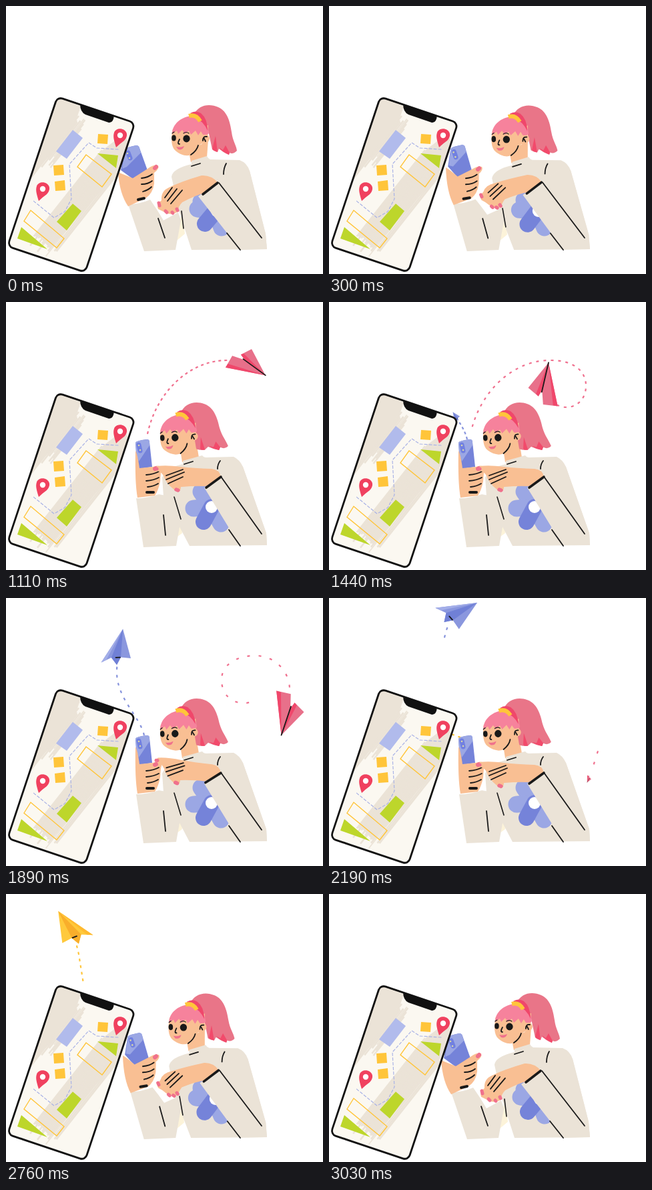
Animation of 475x400 px, one loop 3.06 s. Source, as an HTML page:

```html
<!DOCTYPE html>
<html lang="en">
<head>
<meta charset="utf-8">
<title>Paper planes</title>
<style>
html, body { margin: 0; width: 100%; height: 100%; overflow: hidden; background: #fff; }
svg { display: block; width: 475px; height: 400px; }
.line { fill: none; stroke-linecap: round; stroke-linejoin: round; }
.ink { stroke: #191919; stroke-width: 1.8; }
</style>
</head>
<body>
<svg viewBox="0 0 475 400">
  <defs>
    <rect id="case" x="36.500" y="149" width="122.500" height="235" rx="8" transform="rotate(18.500 97.700 266.500)"/>
    <clipPath id="screen"><use href="#case"/></clipPath>
    <g id="pin">
      <path d="M-6 18C-9 8 -11 2 -9 -4C-7 -10 1 -11 6 -8C12 -4 11 3 6 8Q-1 13 -6 18Z" fill="#f0415f"/>
      <circle r="4.200" fill="#fff"/>
    </g>
    <g id="dart">
      <path d="M0 0L24 62L2 63L-3 42L-7 52L-24 42Z" fill="#e8708a"/>
      <path d="M0 0L24 62L17 62ZM0 0L-3 42L-7 52L-11 49Z" fill="#f0476b"/>
      <path d="M0 0L-3 45" class="line ink"/>
    </g>
    <g id="glider">
      <path d="M0 0L33 54L17 46L8 57L2 45L-14 46Z" fill="var(--main)"/>
      <path d="M0 0L17 46L8 57L2 45Z" fill="var(--fold)"/>
      <path d="M0 0L33 54L25 50Z" fill="var(--edge)"/>
      <path d="M3 45L10 45.500" class="line ink"/>
    </g>
  </defs>

  <g id="sky"></g>
  <g id="body"></g>

  <g id="head">
    <g id="tail"></g>
    <path d="M250 183C247 197 247 210 254 216C261 222 270 225 277 222Q285 218 292 206L302 203L303 178Z" fill="#f9bf93"/>
    <path d="M249 191C249 176 263 165 279 164C295 165 303 177 304 190Q301 194 295 192L292 187L288 193L284 186L277 192L274 186L268 191L264 185L258 191L256 186Z" fill="#f6829c"/>
    <path d="M276 160Q284 155 292 160Q302 168 302 186Q296 172 284 167Z" fill="#f0476b"/>
    <path d="M274 164Q285 161 291 172" class="line" stroke="#ffc53a" stroke-width="6" style="stroke-linecap:butt"/>
    <circle cx="299" cy="198" r="6" fill="#f9bf93"/>
    <g class="line ink">
      <path d="M295 201Q295 194 301 195M297 198L299 202M277 222Q286 216 288 208M260 199Q256 206 260 206"/>
      <path d="M249 190L252 188M266 190Q270 187 274 190" stroke-width="1.200"/>
    </g>
    <ellipse cx="251.500" cy="197" rx="3.300" ry="4.600" fill="#191919"/>
    <ellipse cx="270.500" cy="198" rx="5.200" ry="5.400" fill="#191919"/>
    <path d="M255 210Q261 212 267 209Q265 216 258 214Z" fill="#f0718c"/>
  </g>

  <g id="grip"></g>
  <g id="pointer"></g>

  <g clip-path="url(#screen)">
    <path d="M0 130H200V400H0Z" fill="#fbf8f1"/>
    <g id="brush" fill="none"></g>
    <path d="M100 185L115 197L91 228L75 217Z" fill="#b1bbec"/>
    <path d="M138 191L153 192L152 206L137 205ZM71 238L86 237L87 252L72 253ZM73 262L88 260L89 275L74 276Z" fill="#ffc53a"/>
    <path d="M137 220L168 223L165 242ZM100 295L113 306L91 335L76 322ZM23 330L62 363L17 347Z" fill="#bdd62b"/>
    <path d="M120 222L158 251L144 270L107 240ZM37 305L87 347L76 361L27 321Z" fill="none" stroke="#ffc53a" stroke-width="1.400"/>
    <path d="M168 214L136 212L124 204L95 236L98 288L88 307L72 316L40 290" class="line" stroke="#aab3e6" stroke-width="1.200" stroke-dasharray="4 3"/>
    <use href="#pin" x="171" y="193"/>
    <use href="#pin" x="55" y="273"/>
    <path d="M111 146L162 163Q161 175 154 174L119 162Q111 158 111 146Z" fill="#111"/>
  </g>
  <use href="#case" fill="none" stroke="#111" stroke-width="2.800"/>
</svg>

<script>
const LOOP = 3060, MOVE = 880;
const SKIN = '#f9bf93', WOOL = '#ebe3d7', INK = '#191919', NAIL = '#f0718c', BLUE = '#7583d9', PALE = '#9ba7e4';
const $ = id => document.getElementById(id);

function add(parent, tag, attrs) {
  const el = document.createElementNS('http://www.w3.org/2000/svg', tag);
  for (const key in attrs) el.setAttribute(key, attrs[key]);
  return parent.appendChild(el);
}

// Brushed areas of the map: broad strokes with ragged ends
function brush(count, x, y, dx, dy, length) {
  for (let i = 0; i < count; i++) {
    const a = 7 * Math.sin(i * 7.3), b = 9 * Math.sin(i * 4.1);
    const x1 = x + dx * i - a * .66, y1 = y + dy * i + a * .75;
    add($('brush'), 'path', {
      d: `M${x1} ${y1}l${-.62 * (length + b)} ${.78 * (length + b)}`,
      stroke: WOOL, 'stroke-width': i % 5 == 4 ? 1.6 : 2.6
    });
  }
}
add($('brush'), 'path', { d: 'M70 130L112 150L101 182L58 232L30 268Z', fill: WOOL });
brush(8, 109, 164, 1, 2.2, 78);
add($('brush'), 'path', { d: 'M146 214L178 190L187 215L150 268L66 362L48 342Z', fill: WOOL });
brush(18, 144, 215, 1.9, 1.4, 165);

// Moving parts: colour, pose away, pose close, stroke width (none = filled)
const bodyParts = [
  ['#fcf3d9', 'M264 300L256 350L268 340Z', 'M262 310L257 350L264 345Z'],
  [WOOL, 'M183 296Q200 296 216 289Q226 303 236 320L258 308L262 320L254 364L207 366Z',
         'M195 293Q212 293 229 287Q234 288 240 289L251 290L262 325L255 364L206 366Z'],
  [SKIN, 'M274 218L303 200L301 226L277 233Z', 'M261 220L284 202L289 232L264 239Z'],
  [WOOL, 'M278 231L301 224Q303 228 306 229L350 230Q361 234 365 246L389 340L391 363L278 364L259 305L248 255Q249 243 278 236Z',
         'M265 237L294 229Q296 232 300 232L341 231Q350 235 355 246L390 345L391 363L275 364L236 290L234 262Q240 247 265 242Z'],
  [PALE, 'M314 306L292 292', 'M308 306L292 283', 25],
  [PALE, 'M314 306L323 331', 'M308 306L322 331', 25],
  [PALE, 'M314 306L287 303', 'M308 306L281 308', 25],
  [BLUE, 'M314 306L298 325', 'M308 306L296 328', 24],
  ['#fff', 'M316 306L316 306', 'M308 306L308 306', 18],
  [WOOL, 'M318 264L355 240L365 246L389 340L391 363L351 364L288 284Z',
         'M322 260L350 240L355 246L390 345L391 363L350 363L297 277Z'],
  [INK, 'M331 339L351 364', 'M334 340L351 364', 1.8],
  [INK, 'M319 264L383 346', 'M323 262L383 346', 1.8],
  [INK, 'M326 251Q326 242 330 235', 'M317 249Q317 242 321 237', 1.8],
  [INK, 'M278 239L291 235', 'M267 242L280 238', 1.8],
  [INK, 'M228 317L238 346', 'M236 318L239 348', 1.8],
  [INK, 'M263 306L266 332', 'M252 291L262 324', 1.6]
];
const tailParts = [
  ['#e97588', 'M281 163C288 147 305 145 318 151C332 157 336 174 338 188C340 203 345 207 346 216Q340 222 335 219L334 222Q326 219 319 213L317 218Q311 216 309 214L303 186Z',
              'M281 163C288 147 305 145 318 151C332 157 336 174 338 188C341 201 346 207 349 216Q344 221 337 217L335 221Q326 219 319 215L314 219Q307 220 301 217L298 186Z'],
  ['#f24a6b', 'M314 194L317 218Q310 216 309 213ZM329 208L335 219L334 222Q324 218 319 211L325 215Z',
              'M309 200L314 219Q309 220 307 217ZM331 208L337 217L335 221Q326 219 321 214L327 216Z']
];
const gripParts = [
  [BLUE, 'M178 214Q180 211 195 208Q199 208 200 212L213 248L190 258L172 245Z',
         'M194 210Q195 207 211 205Q215 205 215 209L219 246L199 249L195 225Z'],
  [PALE, 'M178 214Q180 211 195 208Q199 208 200 212L202 219L181 240L174 243Z',
         'M194 210Q195 207 211 205Q215 205 215 209L215 214L199 238L195 225Z'],
  ['#7180e0', 'M183 219L186 227', 'M199 213L201 222', 7],
  ['#d9d6a8', 'M182 220L182 220', 'M199 214L199 214', 2.6],
  ['#d9d6a8', 'M185 227L185 227', 'M201 221L201 221', 2.6],
  [SKIN, 'M168 248Q175 251 190 257L212 243Q222 236 228 238Q230 243 222 249L222 265Q220 280 209 287L183 299Q170 280 168 248Z',
         'M194 222Q197 226 200 248L220 246Q228 243 233 246Q234 250 232 254L231 268Q228 282 223 289L197 292Q193 270 194 222Z'],
  [NAIL, 'M223 242L225 240', 'M223 249L225 248', 6],
  [INK, 'M203 257Q213 256 219 251', 'M210 258Q222 257 229 253', 1.8],
  [INK, 'M203 266Q213 266 219 261', 'M210 267Q222 266 229 262', 1.8],
  [INK, 'M205 277Q213 275 218 270', 'M212 276Q222 275 228 271', 1.8],
  [INK, 'M198 289L207 287', 'M211 284L221 284', 4]
];
const pointerParts = [
  [SKIN, 'M318 264Q308 252 293 253Q262 262 244 271Q232 276 233 290Q225 296 228 303Q234 306 240 309Q250 313 259 306Q257 300 264 293Q285 282 298 279Z',
         'M322 261Q320 250 308 249Q280 248 262 246Q240 243 226 245Q222 250 229 253Q236 256 238 264Q245 277 257 283Q262 282 262 276Q285 274 299 275Z'],
  [NAIL, 'M229 294L230 298', 'M224 249L226 249', 5],
  [NAIL, 'M239 306L241 308', 'M255 280L257 281', 5],
  [NAIL, 'M249 308L250 309', 'M255 280L258 281', 5],
  [NAIL, 'M256 303L257 305', 'M256 280L258 281', 5],
  [INK, 'M238 286L249 271', 'M240 259L265 250', 1.8],
  [INK, 'M242 291L256 273', 'M240 265L267 254', 1.8],
  [INK, 'M247 295L264 275', 'M243 271L265 261', 1.8],
  [INK, 'M295 281L317 264', 'M300 277L322 261', 3.6]
];

function build(parent, parts) {
  return parts.map(([color, a, b, width]) => {
    const el = add(parent, 'path', width
      ? { class: 'line', stroke: color, 'stroke-width': width } : { fill: color });
    const ends = b.match(/[\d.]+/g);
    return p => {
      let i = 0;
      el.setAttribute('d', a.replace(/[\d.]+/g, n => (+n + (ends[i++] - n) * p).toFixed(2)));
    };
  });
}
const figure = [
  ...build($('body'), bodyParts), ...build($('tail'), tailParts),
  ...build($('grip'), gripParts), ...build($('pointer'), pointerParts)
];

// Piecewise linear value through [time, value] pairs
function along(t, keys) {
  if (t <= keys[0][0]) return keys[0][1];
  for (let i = 1; i < keys.length; i++) {
    const [t0, v0] = keys[i - 1], [t1, v1] = keys[i];
    if (t <= t1) return v0 + (v1 - v0) * (t - t0) / (t1 - t0);
  }
  return keys[keys.length - 1][1];
}

const planes = [
  { shape: 'dart', color: '#f0718f', grow: 260, step: [[1110, 9], [1440, 11], [1890, 17]], turn: '',
    d: 'M212 197C225 135 275 86 333 87C365 87 386 102 385 127C384 148 368 158 354 157C335 155 323 142 323 122C323 100 345 86 373 86C402 86 424 108 425 135C426 160 420 180 411 204C400 235 395 260 380 290',
    head: [[585, 0], [1110, 238], [1440, 383], [1890, 570], [2210, 650]],
    tail: [[1440, 0], [1890, 285], [2210, 600]] },
  { shape: 'glider', color: '#8592dc', grow: 180, step: [[1440, 8], [1890, 12]], turn: 'scale(-1 1) rotate(9)',
    vars: '--main:#8a97de;--fold:#7080d6;--edge:#a3aee8',
    d: 'M207 205C200 175 165 150 166 108C167 85 171 65 176 48C183 24 202 13 228 14Q245 16 255 24',
    head: [[1270, 0], [1440, 46], [1890, 169], [2160, 225], [2340, 265]],
    tail: [[1950, 0], [2340, 240]] },
  { shape: 'glider', color: '#ffc53a', grow: 110, step: [[0, 10]], turn: 'rotate(9)',
    vars: '--main:#ffc93c;--fold:#f9ae2b;--edge:#ffba30',
    d: 'M197 208C170 200 125 175 118 146L109 90C100 45 80 24 58 28Q40 32 28 52',
    head: [[2085, 0], [2490, 162], [2960, 285]],
    tail: [[2600, 0], [2960, 260]] }
];
for (const plane of planes) {
  plane.trail = add($('sky'), 'path', { d: plane.d, fill: 'none', stroke: plane.color, 'stroke-width': 2.2 });
  plane.body = add($('sky'), 'use', { href: '#' + plane.shape, style: plane.vars || '' });
}

function fly(plane, t) {
  const { head, tail, trail, body, grow, step, turn } = plane;
  const start = head[0][0], end = head[head.length - 1][0];
  const shown = t > start && t < end;
  trail.style.display = body.style.display = shown ? '' : 'none';
  if (!shown) return;

  // The middle of the plane follows the path; its nose points along it
  const s = along(t, head);
  const scale = Math.min(1, s / grow, (end - t) / 120);
  const at = d => trail.getPointAtLength(Math.max(0, s - d * scale));
  const mid = at(36), from = at(48), to = at(8);
  const angle = Math.atan2(to.x - from.x, from.y - to.y) * 180 / Math.PI;
  body.setAttribute('transform',
    `translate(${mid.x} ${mid.y}) rotate(${angle}) scale(${scale}) translate(0 -36) ${turn}`);

  const gap = along(t, step);
  const first = Math.ceil(along(t, tail) / gap) * gap;
  const dots = Math.max(0, Math.floor((s - 45 * scale - first) / gap));
  trail.setAttribute('stroke-dasharray', `0 ${first} ` + `4 ${gap - 4} `.repeat(dots) + '0 2000');
  trail.style.visibility = dots ? '' : 'hidden';
}

function draw(now) {
  const t = now % LOOP;
  const u = Math.min(1, t / MOVE, (LOOP - t) / MOVE);
  const p = u * u * (3 - 2 * u);
  figure.forEach(pose => pose(p));
  $('head').setAttribute('transform', `translate(${-16 * p} ${4.5 * p}) rotate(${-4 * p} 270 215)`);

  // The pointing hand lifts for each tap
  const tap = p * Math.max(0, Math.cos((t - 570) / 1320 * 2 * Math.PI)) ** 4;
  $('pointer').setAttribute('transform', `rotate(${4 * tap} 320 260)`);
  planes.forEach(plane => fly(plane, t));
}

const began = performance.now();
function tick() {
  draw(performance.now() - began);
  requestAnimationFrame(tick);
}
tick();
</script>
</body>
</html>
```
